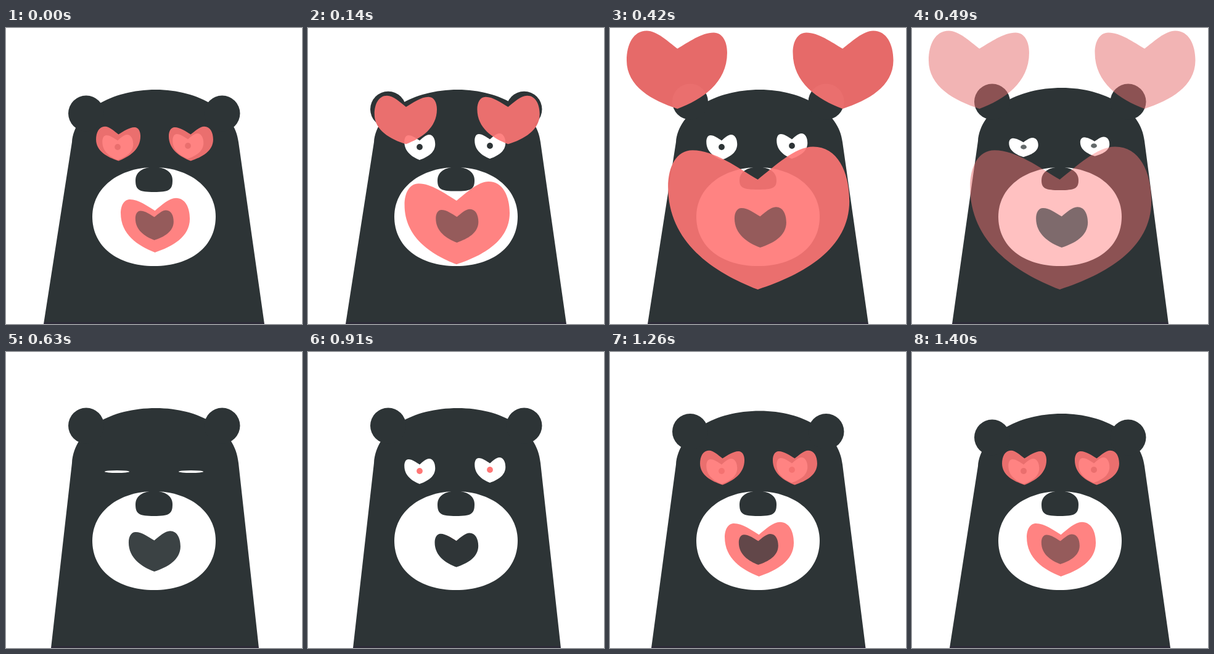
Animation, 480 px wide and 480 px high, one loop 1470 ms. Source, as an HTML page with a canvas:

```html
<!DOCTYPE html>
<html lang="en">
<head>
<meta charset="utf-8">
<title>Bear in love</title>
<style>
  html, body { margin: 0; width: 100%; height: 100%; overflow: hidden; background: #fff; }
  canvas { display: block; width: 100vw; height: 100vh; }
</style>
</head>
<body>
<canvas id="stage" width="480" height="480"></canvas>
<script>
const ctx = document.getElementById('stage').getContext('2d');
const LOOP = 1470, STEP = 70;
const DARK = '#2d3436', PINK = '#ff7675', ROSE = '#e66a69';

const mix = (a, b, u) => a + (b - a) * u;

// Smooth 0 to 1 between two times
function ease(t, from, to) {
  const u = Math.min(1, Math.max(0, (t - from) / (to - from)));
  return u * u * (3 - 2 * u);
}

// Lopsided heart standing on its tip; each half runs notch, lobe top, side, tip
function heart(x, y, w, h, flip = false) {
  const p = new Path2D();
  const px = u => x + (flip ? -w : w) * (u - .495), py = v => y + h * (v - 1);
  const half = (tx, ty, sx, sy) => {
    const curve = (a, b, c, d, e, f) => p.bezierCurveTo(px(a), py(b), px(c), py(d), px(e), py(f));
    p.moveTo(px(.495), py(.23));
    curve(mix(.495, tx, .3), mix(.23, ty, .4), mix(.495, tx, .67), ty, tx, ty);
    curve(mix(tx, sx, .67), ty, sx, mix(ty, sy, .46), sx, sy);
    curve(sx, mix(sy, 1, .54), mix(sx, .495, .5), mix(sy, 1, .83), .495, 1);
  };
  half(.8, 0, 1, .38);
  half(.135, .024, 0, .28);
  return p;
}

function oval(x, y, rx, ry) {
  const p = new Path2D();
  p.ellipse(x, y, rx, ry, 0, 0, Math.PI * 2);
  return p;
}

function paint(path, color, alpha = 1, mode = 'source-over') {
  ctx.globalAlpha = alpha;
  ctx.globalCompositeOperation = mode;
  ctx.fillStyle = color;
  ctx.fill(path);
}

function body(t, settle) {
  const rise = ease(t, 420, 600) - settle;
  const top = 100 - 9 * rise, bend = 136 - 12 * rise, side = 185 - 5 * rise, foot = 61 + 12 * rise;
  paint(new Path2D(`M${foot} 480L107 ${side}C111 ${bend} 170 ${top} 243 ${top}
    C313 ${top} 372 ${bend} 377 ${side}L${480 - foot + rise * 3} 480Z`), DARK);

  const ear = 138.5 - 19 * (ease(t, 0, 350) - settle);
  for (const x of [130, 350.5]) paint(oval(x, ear, 29, 29), DARK);

  const floor = new Path2D();
  floor.rect(0, 477, 480, 3);
  paint(floor, '#2d2b38', 1, 'source-atop');
}

function snout(t) {
  paint(new Path2D(`M140 306C140 259 183 226 240 226S340 259 340 306
    C340 354 300 386 240 386S140 354 140 306Z`), '#fff');
  const low = 266 - 4 * (ease(t, 0, 350) - ease(t, 420, 630));
  paint(new Path2D(`M210 247C210 233 223 225.5 240 225.5S270 233 270 247
    C270 ${low - 3} 264 ${low} 240 ${low}S210 ${low - 3} 210 247Z`), DARK);
}

// Eye around its pupil, closing to a slit
function eye(t, x, y, slitX, settle) {
  const open = 1 - ease(t, 420, 630) + ease(t, 630, 860);
  const lid = open < .08
    ? oval(slitX, 194, 20, 2)
    : heart(mix(slitX, x, open), mix(196, y + 21, open), mix(40, 50, open), mix(4, 41, open));
  paint(lid, '#fff');
  const pupil = oval(x, y, 4.9, 4.9 * open);
  paint(pupil, PINK, ease(t, 630, 910));
  paint(pupil, DARK, 1 - ease(t, 420, 630) + settle);
}

// Heart that buds from a seed, rests, then swells; [x, y, width] at each stage.
// Translucent over the bear, solid rose beyond its outline.
function love(t, ratio, flip, seed, rest, big) {
  const bud = t > 770;
  const [x, y, w] = rest.map((v, i) => bud
    ? mix(seed[i], v, ease(t, 910, 1120))
    : mix(v, big[i], ease(t, 0, 370)));
  const alpha = bud ? 1 : 1 - ease(t, 420, 560);
  const path = heart(x, y, w, w * ratio, flip);
  paint(path, PINK, .9 * alpha, 'source-atop');
  paint(path, ROSE, alpha, 'destination-over');
}

function mouth(t, settle) {
  const swell = ease(t, 0, 370), blink = ease(t, 420, 630);
  const w = 62 + 22 * swell - 18 * ease(t, 630, 1050) - 4 * settle;
  const alpha = .5 + .43 * blink + .06 * ease(t, 630, 910) - .49 * settle;
  paint(heart(240.5 + 3 * (swell - blink), 344 + .55 * (w - 62), w, w * .783), DARK, alpha);
}

function draw(t) {
  const settle = ease(t, 1120, 1400);
  ctx.clearRect(0, 0, 480, 480);
  body(t, settle);
  snout(t);
  eye(t, 181, 193, 180, settle);
  eye(t, 295, 191, 300, settle);
  love(t, .776, true, [181, 193, 0], [182.4, 215.5, 72], [109.3, 131, 163]);
  love(t, .776, false, [295, 191, 0], [299.6, 215.5, 72], [377.2, 131, 163]);
  love(t, .787, false, [241, 344, 62], [241.5, 364, 112], [239.7, 424, 294]);
  mouth(t, settle);
}

const start = performance.now();
function tick() {
  const t = (performance.now() - start) % LOOP;
  draw(Math.floor(t / STEP) * STEP);
  requestAnimationFrame(tick);
}
tick();
</script>
</body>
</html>
```
